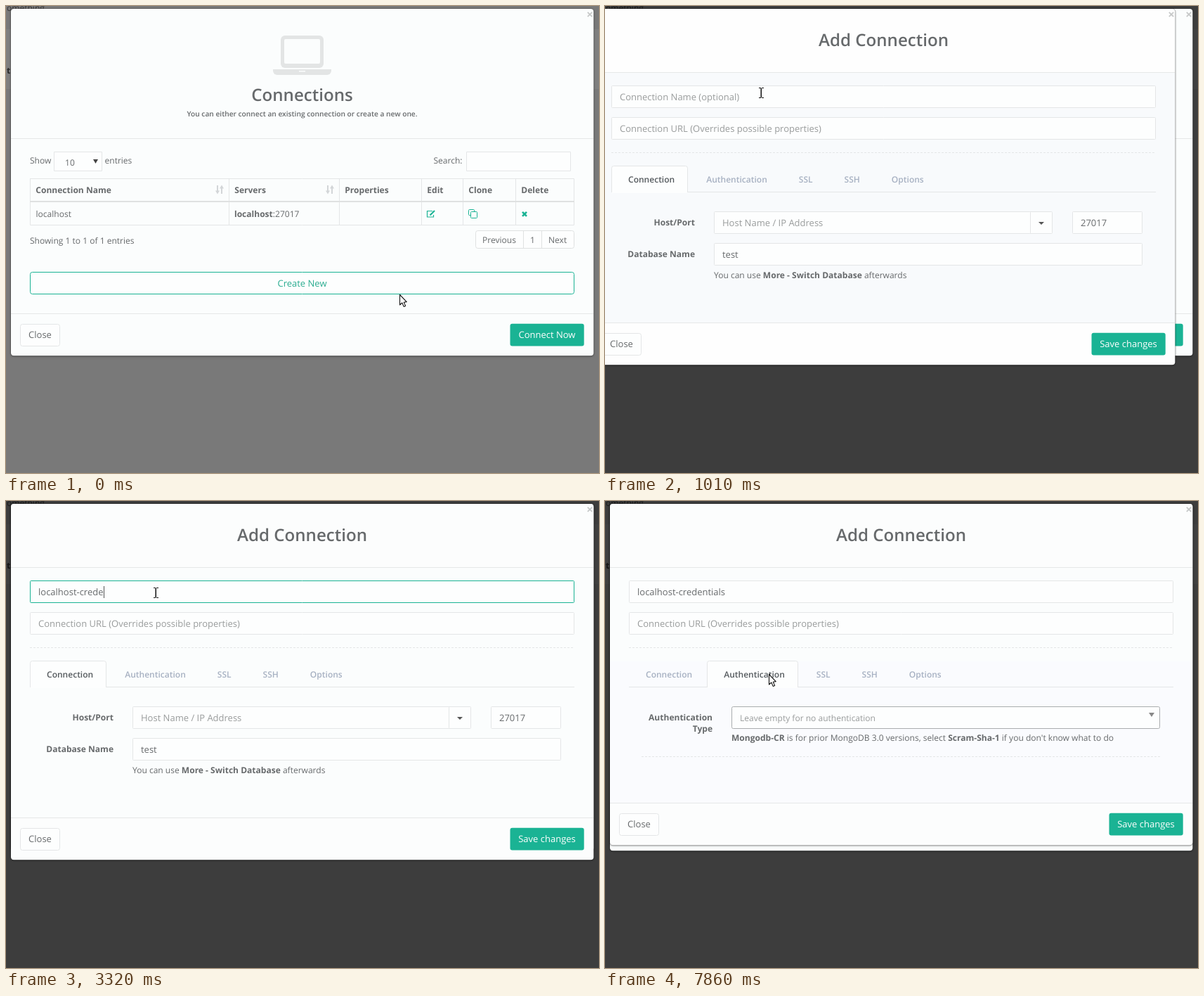
Write an HTML page with a canvas that moves like this. It is 844x664 px and loops after 8 s.

```html
<!DOCTYPE html>
<html lang="en">
<head>
<meta charset="utf-8">
<title>Add connection</title>
<style>
  html, body { margin: 0; width: 100%; height: 100%; overflow: hidden; background: #3c3c3c; }
  canvas { display: block; }
</style>
</head>
<body>
<canvas id="stage" width="844" height="664"></canvas>
<script>
const ctx = document.getElementById('stage').getContext('2d');
const LOOP = 8000, REFRESH = 105, PHASE = 45;
const SMALL = 12.04, INPUT = 13, TITLE = 24.14;
const GREEN = '#1ab394', INK = '#676a6c', HINT = '#999c9c', LINE = '#e4e6e7', RULE = '#e6e8e8';
const PAPER = '#fbfdfd', FIELD = '#fdfefe';

const MODAL_IN = 410, FOCUS_NAME = 1420, FOCUS_HOST = 4690, FOCUS_PORT = 6040, FOCUS_DB = 6460, AUTH = 7720;

const clamp = v => Math.max(0, Math.min(1, v));
const easeOut = p => 1 - (1 - p) ** 3;
const mix = (a, b, p) => a + (b - a) * p;

// Letters of a word typed at a steady pace
const typed = (word, t, start, pace) => word.slice(0, Math.max(0, 1 + Math.floor((t - start) / pace)));

function focusAt(t) {
  if (t < FOCUS_NAME || t >= AUTH) return '';
  if (t < FOCUS_HOST) return 'name';
  if (t < FOCUS_PORT) return 'host';
  return t < FOCUS_DB ? 'port' : 'db';
}

// Each move: start, end, x, y
function pointerAt(t) {
  const moves = [[0, 380, 503, 392], [600, 1005, 222, 123], [1005, 1200, 213, 130],
    [3800, 4050, 344, 72], [4050, 4490, 299, 305], [7400, 7650, 233, 246]];
  let x = 560, y = 410;
  for (const [start, end, toX, toY] of moves) {
    const p = easeOut(clamp((t - start) / (end - start)));
    x = mix(x, toX, p);
    y = mix(y, toY, p);
  }
  return [Math.round(x), Math.round(y)];
}

// Bounce in from the right over one second
function bounceX(ms) {
  let x = 3000, start = 0;
  for (const [end, to] of [[600, -25], [750, 10], [900, -5], [1000, 0]]) {
    x = mix(x, to, easeOut(clamp((ms - start) / (end - start))));
    start = end;
  }
  return x;
}

function setFont(size, weight = 400) {
  ctx.font = `${weight} ${size}px "Open Sans", sans-serif`;
}

function text(str, x, y, { size = SMALL, weight = 400, color = INK, align = 'left' } = {}) {
  setFont(size, weight);
  ctx.fillStyle = color;
  ctx.textAlign = align;
  ctx.fillText(str, x, y);
  return ctx.measureText(str).width;
}

// Alternating regular and bold runs
function runs(parts, x, y, bold) {
  parts.forEach((part, i) => {
    x += text(part, x, y, { weight: i % 2 === bold ? 700 : 400 });
  });
}

function box(x, y, w, h, fill, stroke, r = 0) {
  ctx.beginPath();
  if (stroke) ctx.roundRect(x + .5, y + .5, w - 1, h - 1, r);
  else ctx.roundRect(x, y, w, h, r);
  if (fill) { ctx.fillStyle = fill; ctx.fill(); }
  if (stroke) { ctx.strokeStyle = stroke; ctx.lineWidth = 1; ctx.stroke(); }
}

function rect(x, y, w, h, color) {
  ctx.fillStyle = color;
  ctx.fillRect(x, y, w, h);
}

function poly(points, fill, stroke, width = 1) {
  ctx.beginPath();
  points.forEach(([x, y], i) => i ? ctx.lineTo(x, y) : ctx.moveTo(x, y));
  if (fill) { ctx.closePath(); ctx.fillStyle = fill; ctx.fill(); }
  if (stroke) { ctx.strokeStyle = stroke; ctx.lineWidth = width; ctx.stroke(); }
}

const triangle = (x, y, w, h, color) => poly([[x, y], [x + w, y], [x + w / 2, y + h]], color);

function cross(x, y, r, color, width) {
  poly([[x - r, y - r], [x + r, y + r]], null, color, width);
  poly([[x + r, y - r], [x - r, y + r]], null, color, width);
}

function dashes(x, y, w) {
  ctx.setLineDash([3, 2]);
  poly([[x, y + .5], [x + w, y + .5]], null, LINE);
  ctx.setLineDash([]);
}

function panel(foot, fill) {
  const h = foot + 56.3;
  ctx.save();
  ctx.shadowColor = 'rgba(0,0,0,.35)';
  ctx.shadowBlur = 3;
  ctx.shadowOffsetY = 1;
  box(7, 4, 829.4, h, fill, null, 4);
  ctx.restore();
  box(6, 3, 831.4, h + 2, null, 'rgba(0,0,0,.2)', 5);
  cross(831, 12, 3.2, '#c6c8c8', 1.8);
}

// Bottom bar with a plain button on the left and a green one on the right
function footer(foot, label) {
  rect(7, foot, 829, 1, RULE);
  box(20, foot + 15, 57, 32, FIELD, LINE, 3);
  box(717.5, foot + 14.8, 105.2, 31.6, GREEN, null, 3);
  text('Close', 48.5, foot + 35, { size: INPUT, align: 'center' });
  text(label, 770, foot + 35, { size: INPUT, color: '#fff', align: 'center' });
}

function page(t) {
  const dim = 1 - .5 * clamp((t - 330) / 150);
  const gray = v => { const n = Math.round(v * dim); return `rgb(${n},${n},${n})`; };
  rect(0, 0, 844, 664, gray(121));
  rect(0, 33, 844, 85, gray(127));
  text('omething', 1, 7, { color: gray(52) });
  text('t', 1, 96, { weight: 700, color: gray(40) });
}

function laptop() {
  const tone = '#e3e5e5';
  box(391, 42, 61, 46, tone, null, 6);
  box(396, 47, 51, 35, PAPER, null, 2);
  box(380, 90, 83, 8, tone, null, [0, 0, 6, 6]);
  rect(417, 92, 9, 1.5, PAPER);
}

function sortIcon(x) {
  const tone = '#d3d6d8';
  rect(x + 2, 255, 2, 9, tone);
  triangle(x, 262.5, 6, 5, tone);
  rect(x + 8, 258, 2, 9, tone);
  triangle(x + 6, 259.5, 6, -5, tone);
}

function rowIcons() {
  poly([[607, 291.5], [599.5, 291.5], [599.5, 300], [608.5, 300], [608.5, 297]], null, GREEN, 1.2);
  poly([[603.5, 297.5], [610, 291]], null, GREEN, 2.2);
  box(658, 289, 9, 9, null, GREEN, 1);
  box(661, 292, 10, 10, PAPER, GREEN, 1);
  cross(738, 295.8, 3, GREEN, 2.6);
}

function connectionTable() {
  const columns = { 'Connection Name': 34, Servers: 317, Properties: 474, Edit: 591, Clone: 650, Delete: 725 };
  box(34, 245, 775, 67, null, LINE);
  for (const [label, x] of Object.entries(columns)) {
    rect(x, 245, 1, 66, LINE);
    text(label, x + 8.3, 266, { weight: 700 });
  }
  rect(34, 277, 775, 2, '#dfe1e1');
  sortIcon(columns.Servers - 19);
  sortIcon(columns.Properties - 19);
  text('localhost', 42.5, 299.5);
  runs(['localhost', ':27017'], 325, 299.5, 0);
  rowIcons();
}

function connections(t) {
  panel(437, PAPER);
  laptop();
  text('Connections', 421.5, 135, { size: TITLE, weight: 600, align: 'center' });
  text('You can either connect an existing connection or create a new one.', 421.5, 156.5,
    { size: 10.21, weight: 600, align: 'center' });
  rect(7, 188, 829, 1, RULE);

  text('Show', 34, 224);
  box(68, 207, 69, 28, FIELD, LINE);
  text('10', 84, 227);
  triangle(124, 218, 7, 6, '#444');
  text('entries', 140.5, 224);
  text('Search:', 608.5, 224);
  box(655, 207, 149, 28, FIELD, LINE);

  connectionTable();
  text('Showing 1 to 1 of 1 entries', 34, 337.5);
  box(668, 319, 141, 26, FIELD, '#dfe1e1', 3);
  rect(736, 319, 1, 26, '#dfe1e1');
  rect(762, 319, 1, 26, '#dfe1e1');
  text('Previous', 678, 336.5);
  text('1', 749.5, 336.5, { align: 'center' });
  text('Next', 772, 336.5);

  const hover = pointerAt(t)[1] < 406;
  box(34, 378, 775, 32, hover ? '#29ad91' : FIELD, GREEN, 3);
  text('Create New', 421.5, 398.5, { size: INPUT, color: hover ? '#fff' : '#2aac90', align: 'center' });
  footer(437, 'Connect Now');
}

function field(x, y, w, { value = '', hint = '', focus = false, selected = false }) {
  const left = x + 12, base = y + 21;
  box(x, y, w, 32, FIELD, focus ? GREEN : LINE, 1);
  setFont(INPUT);
  const width = ctx.measureText(value).width;
  if (selected) rect(left, y + 8, width, 18, '#3390ff');
  text(value || hint, left, base, { size: INPUT, color: selected ? '#fff' : value ? INK : HINT });
  if (focus && !selected) rect(Math.ceil(left + width - .05), y + 8, 1, 17, '#555');
}

function tabs(active, fill) {
  let x = 58;
  rect(34, 264, 775, 1, LINE);
  for (const label of ['Connection', 'Authentication', 'SSL', 'SSH', 'Options']) {
    setFont(SMALL, 600);
    const width = ctx.measureText(label).width, on = label === active;
    if (on) {
      const left = Math.round(x - 24), w = Math.round(width + 43);
      box(left, 227, w, 42, FIELD, LINE, 3);
      rect(left - 1, 265, w + 2, 5, fill);
      rect(left + 1, 263, w - 2, 3, FIELD);
    }
    text(label, x, 250.5, { weight: 600, color: on ? '#555a5e' : '#a7b1c2' });
    x += width + 45;
  }
}

const rightLabel = (str, y) => text(str, 153, y, { weight: 700, align: 'right' });

function connectionTab(t, focus) {
  const name = typed('mydb', t, 6660, 180);
  rightLabel('Host/Port', 311.5);
  box(600, 292, 62, 32, FIELD, LINE, 1);
  triangle(642, 307, 8, 4, '#555');
  field(180, 292, 451, {
    value: typed('localhost', t, 5090, 78), hint: 'Host Name / IP Address', focus: focus === 'host'
  });
  field(690, 292, 100, { value: '27017', focus: focus === 'port', selected: focus === 'port' });
  rightLabel('Database Name', 357);
  field(180, 337, 610, { value: name || 'test', focus: focus === 'db', selected: focus === 'db' && !name });
  runs(['You can use ', 'More - Switch Database', ' afterwards'], 180, 386.5, 1);
}

function authTab() {
  rightLabel('Authentication', 311.5);
  rightLabel('Type', 328);
  box(180, 292, 610, 32, FIELD, '#aaadae', 2);
  text('Leave empty for no authentication', 192, 312.5, { color: HINT });
  triangle(774, 301, 8, 6, '#888');
  runs(['Mongodb-CR', ' is for prior MongoDB 3.0 versions, select ', 'Scram-Sha-1',
    " if you don't know what to do"], 180, 341, 0);
  dashes(52, 363, 738);
}

function addConnection(t) {
  const ms = t - MODAL_IN;
  if (ms < 0) return;
  const auth = t >= AUTH, settled = t >= FOCUS_NAME, focus = focusAt(t);
  const foot = auth ? 429 : 450;
  const fill = auth ? '#fafbfe' : settled ? PAPER : '#f8fafc';
  ctx.save();
  ctx.globalAlpha = easeOut(clamp(ms / 600));
  ctx.translate(Math.round(bounceX(ms)), 0);
  panel(foot, settled ? '#fcfdfd' : '#fefefe');
  rect(7, 94, 829, 134, auth ? PAPER : fill);
  rect(7, 228, 829, foot - 228, fill);
  rect(7, 94, 829, 1, RULE);
  text('Add Connection', 421.5, 57, { size: TITLE, weight: 600, align: 'center' });

  field(34, 113, 775, {
    value: typed('localhost-', t, 1730, 94) + typed('credentials', t, 2894, 84.5),
    hint: 'Connection Name (optional)', focus: focus === 'name'
  });
  field(34, 158, 775, { hint: 'Connection URL (Overrides possible properties)' });
  dashes(34, 208, 775);
  tabs(auth ? 'Authentication' : 'Connection', fill);
  if (auth) authTab();
  else connectionTab(t, focus);
  footer(foot, 'Save changes');
  ctx.restore();
}

function pointer(t) {
  const beam = t >= 1000 && t < 4000 || t >= 4350 && t < 7400;
  ctx.save();
  ctx.translate(...pointerAt(t));
  if (beam) {
    rect(-.5, -6, 1.5, 13, '#111');
    for (const x of [-3, 1]) for (const y of [-7, 7]) rect(x, y, 3, 1, '#111');
  } else {
    ctx.lineJoin = 'round';
    const shape = [[.5, .5], [.5, 15], [3.8, 12], [6.2, 17.4], [8.6, 16.4], [6.3, 11.2], [10.2, 10.6], [.5, .5]];
    poly(shape, '#fff', '#111', 1.1);
  }
  ctx.restore();
}

function draw() {
  const now = performance.now() % LOOP;
  const t = Math.max(0, Math.floor((now + PHASE) / REFRESH) * REFRESH - PHASE);
  ctx.textRendering = 'geometricPrecision';
  page(t);
  connections(t);
  addConnection(t);
  pointer(t);
  requestAnimationFrame(draw);
}
draw();
</script>
</body>
</html>
```
